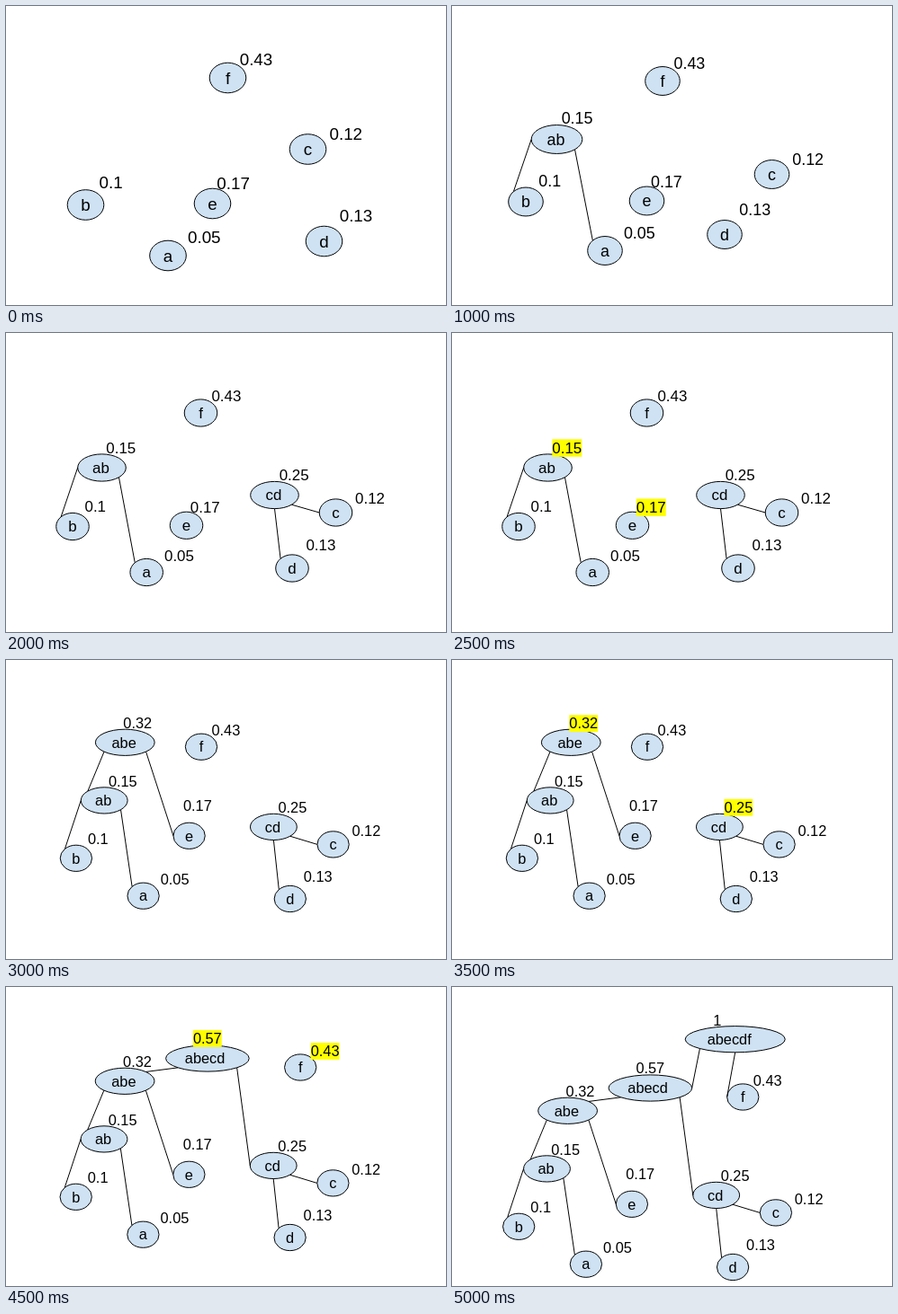
An HTML page for the animation above (6000 ms loop, 489 by 333 pixels).

```html
<!DOCTYPE html>
<html lang="en">
<head>
<meta charset="utf-8">
<title>Merging weighted nodes</title>
<style>
  html, body { margin: 0; width: 100%; height: 100%; overflow: hidden; background: #fff; }
  svg { display: block; width: 489px; height: 333px; font-family: "Liberation Sans", Arial, sans-serif; }
  ellipse { fill: #cfe2f3; stroke: #000; }
  line { stroke: #000; }
  .node { text-anchor: middle; }
  .mark { fill: #ff0; }
</style>
</head>
<body>
<svg id="stage" viewBox="0 0 489 333"></svg>
<script>
const STEP = 500, SLOTS = 12;
const FONT = 18.8, RY = 16.8;

// Sizes and weight offsets are for scale 1.
const nodes = {
  a: { weight: '0.05', rx: 20.3, label: [22, -20.9] },
  b: { weight: '0.1', rx: 20.3, label: [15, -24.8] },
  c: { weight: '0.12', rx: 20.3, label: [24, -17.4] },
  d: { weight: '0.13', rx: 20.3, label: [17.2, -29] },
  e: { weight: '0.17', rx: 20.3, label: [4.8, -22.6], joinedLabel: [-7.6, -39] },
  f: { weight: '0.43', rx: 20.3, label: [13.2, -21] },
  ab: { weight: '0.15', rx: 29.8, label: [5.4, -24.7], textShift: -1 },
  cd: { weight: '0.25', rx: 29.8, label: [5.8, -25.2], textShift: -1 },
  abe: { weight: '0.32', rx: 37.8, label: [-2.3, -24.6], textShift: -1.2 },
  abecd: { weight: '0.57', rx: 53.2, label: [-18.4, -25.8], textShift: -2.8 },
  abecdf: { weight: '1', rx: 63.8, label: [-28.2, -24.2], textShift: -6.5 }
};

// Parent, its connection side, child, its connection side.
const edges = [
  ['ab', 'W', 'b', 'NW'], ['ab', 'SE', 'a', 'NW'],
  ['cd', 'S', 'd', 'NW'], ['cd', 'SE', 'c', 'W'],
  ['abe', 'SW', 'ab', 'NW'], ['abe', 'SE', 'e', 'W'],
  ['abecd', 'SW', 'abe', 'NE'], ['abecd', 'SE', 'cd', 'W'],
  ['abecdf', 'SW', 'abecd', 'E'], ['abecdf', 'S', 'f', 'W']
];
const sides = ['E', 'SE', 'S', 'SW', 'W', 'NW', 'N', 'NE'];

const tree = {
  abe: [132.3, 91.8], ab: [109.2, 156.4], b: [77.9, 220.8], a: [152.6, 262.7],
  e: [203.6, 195.8], cd: [297.4, 185.9], c: [363.6, 205.4], d: [315.8, 266]
};
const root = { ...tree, abecd: [224.1, 66.5] };
const shifted = (points, dx, dy) =>
  Object.fromEntries(Object.entries(points).map(([id, [x, y]]) => [id, [x + dx, y + dy]]));

const scenes = [
  { scale: 1, marked: ['b', 'a'], at: {
    f: [246.5, 80], c: [335.5, 159.5], b: [88.5, 221.5],
    e: [229.5, 220], a: [180, 278], d: [353.5, 262] } },
  { scale: 0.95, marked: ['c', 'd'], at: {
    f: [234, 83.5], ab: [116.5, 148.5], b: [82, 218], a: [170, 272.5],
    e: [216.5, 217], d: [303, 254.5], c: [355.5, 187.5] } },
  { scale: 0.9, marked: ['ab', 'e'], at: {
    f: [216.5, 89], ab: [106.5, 150], b: [74, 215.5], a: [156.2, 266.5],
    e: [200.5, 214.3], cd: [298.5, 180.5], c: [366.5, 200], d: [318, 262] } },
  { scale: 0.87, marked: ['abe', 'cd'], at: { ...tree, f: [217, 96.7] } },
  { scale: 0.87, marked: ['abecd', 'f'], at: { ...shifted(root, -0.2, 13), f: [327.2, 89.5] } },
  { scale: 0.87, marked: [], at: { ...shifted(root, -3.7, 46), f: [323.3, 122.5], abecdf: [314.7, 58.2] } }
];

function sitePoint({ at, scale }, id, side) {
  const angle = sides.indexOf(side) * Math.PI / 4;
  return [at[id][0] + nodes[id].rx * scale * Math.cos(angle),
          at[id][1] + RY * scale * Math.sin(angle)];
}

function edgeMarkup(scene, [parent, from, child, to]) {
  const [x1, y1] = sitePoint(scene, parent, from);
  const [x2, y2] = sitePoint(scene, child, to);
  return `<line x1="${x1}" y1="${y1}" x2="${x2}" y2="${y2}"/>`;
}

function nodeMarkup({ at, scale }, id) {
  const [x, y] = at[id], { rx, textShift = 0 } = nodes[id];
  return `<ellipse cx="${x}" cy="${y}" rx="${rx * scale}" ry="${RY * scale}"/>
    <text class="node" x="${x + textShift}" y="${y + 0.35 * FONT * scale}">${id}</text>`;
}

function weightMarkup({ at, scale, marked }, id, highlight) {
  const { weight, label, joinedLabel } = nodes[id];
  const [dx, dy] = at.abe && joinedLabel || label;
  const size = FONT * scale, x = at[id][0] + dx * scale, y = at[id][1] + dy * scale;
  const width = (0.556 * (weight.length - 1) + 0.278) * size;
  const mark = highlight && marked.includes(id)
    ? `<rect class="mark" x="${x}" y="${y - 0.56 * size}" width="${width}" height="${1.15 * size}"/>` : '';
  return `${mark}<text x="${x}" y="${y + 0.36 * size}">${weight}</text>`;
}

function sceneMarkup(slot) {
  const scene = scenes[slot >> 1], ids = Object.keys(scene.at);
  return `<g font-size="${FONT * scene.scale}">` + [
    ...ids.map(id => nodeMarkup(scene, id)),
    ...edges.filter(([parent]) => scene.at[parent]).map(edge => edgeMarkup(scene, edge)),
    ...ids.map(id => weightMarkup(scene, id, slot % 2 === 1))
  ].join('') + '</g>';
}

const stage = document.getElementById('stage');
const start = performance.now();
let shown = -1;

function draw() {
  const slot = Math.floor((performance.now() - start) / STEP) % SLOTS;
  if (slot !== shown) stage.innerHTML = sceneMarkup(shown = slot);
  requestAnimationFrame(draw);
}
draw();
</script>
</body>
</html>
```
